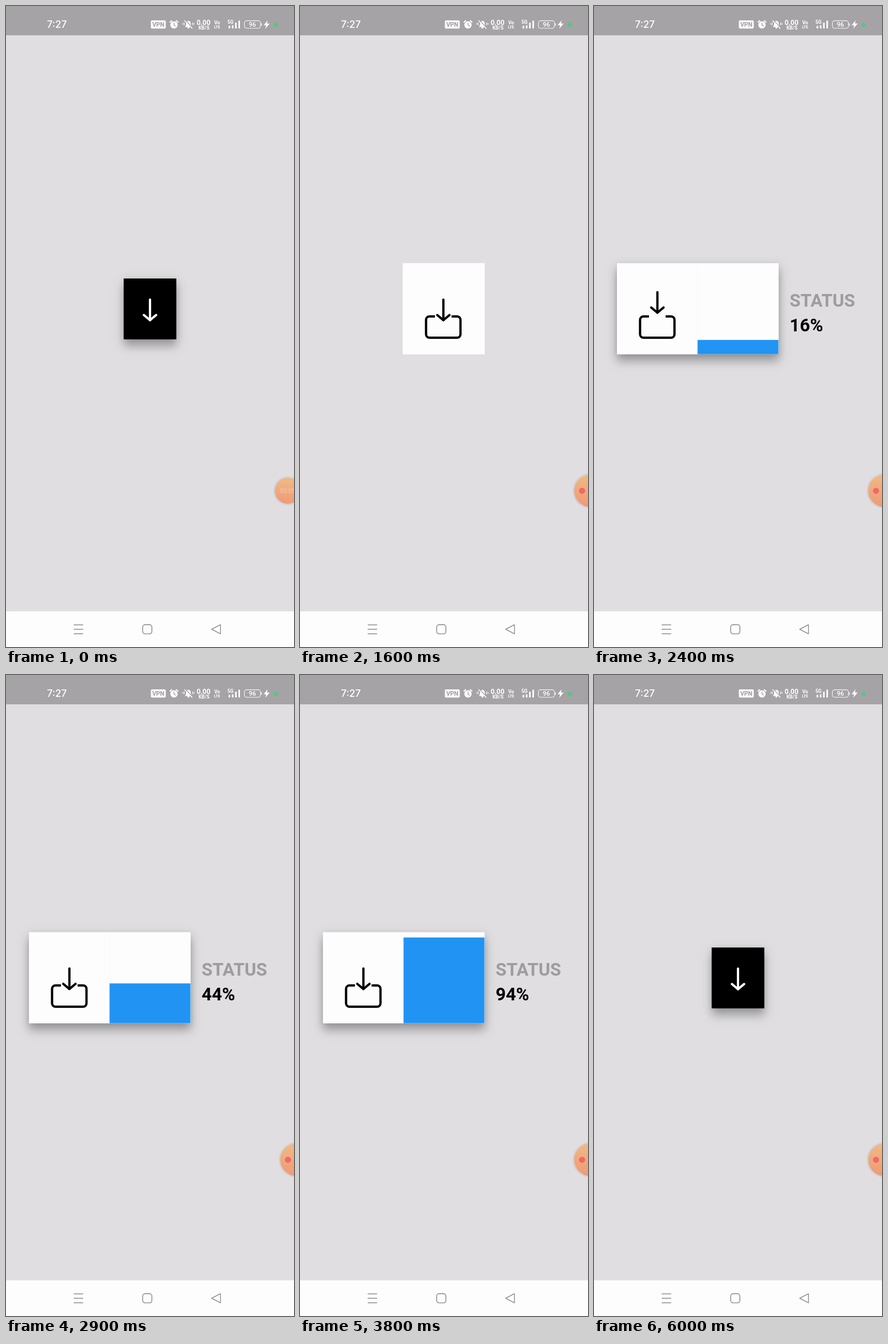
An HTML page with a canvas that plays this animation: 502 px wide and 1115 px high, repeating every 6700 ms.

```html
<!DOCTYPE html>
<html lang="en">
<head>
<meta charset="utf-8">
<title>Download button</title>
<style>
  html, body { margin: 0; width: 100%; height: 100%; overflow: hidden; background: #e0dee1; }
  canvas { display: block; width: 502px; height: 1115px; }
</style>
</head>
<body>
<canvas id="stage"></canvas>
<script>
const W = 502, H = 1115, LOOP = 6700, STEP = 100;
const canvas = document.getElementById('stage');
const dpr = window.devicePixelRatio || 1;
canvas.width = W * dpr;
canvas.height = H * dpr;
const c = canvas.getContext('2d');

// Button geometry
const SMALL = { x: 205.5, y: 474, w: 91, h: 105.5 };
const PANEL = { x: 180.5, y: 447.7, w: 141, h: 158 };
const BLUE = '#2194f3';

const clamp = v => Math.min(1, Math.max(0, v));
const span = (t, a, b) => clamp((t - a) / (b - a));
const ease = p => p * p * (3 - 2 * p);
const mix = (a, b, p) => a + (b - a) * p;

function rect(x, y, w, h, color) {
  c.fillStyle = color;
  c.fillRect(x, y, w, h);
}

function disc(x, y, r, color) {
  c.fillStyle = color;
  c.beginPath();
  c.arc(x, y, r, 0, Math.PI * 2);
  c.fill();
}

function line(points, color, width, cap = 'round', close = false) {
  c.strokeStyle = color;
  c.lineWidth = width;
  c.lineCap = cap;
  c.lineJoin = cap === 'round' ? 'round' : 'miter';
  c.beginPath();
  points.forEach(([x, y], i) => i ? c.lineTo(x, y) : c.moveTo(x, y));
  if (close) c.closePath();
  c.stroke();
}

function roundBox(x, y, w, h, r) {
  c.beginPath();
  c.roundRect(x, y, w, h, r);
}

function text(str, x, y, size, weight, color, align = 'left', family = 'Roboto') {
  c.font = `${weight} ${size}px ${family}, sans-serif`;
  c.textAlign = align;
  c.fillStyle = color;
  c.fillText(str, x, y);
}

function alarmIcon(x, y) {
  disc(x, y + 0.8, 6.4, '#fff');
  line([[x - 7, y - 4], [x - 4, y - 6.5]], '#fff', 1.8);
  line([[x + 7, y - 4], [x + 4, y - 6.5]], '#fff', 1.8);
  line([[x, y - 2.5], [x, y + 1.2], [x + 2.6, y + 2.8]], '#a5a3a6', 1.4);
}

function bellIcon(x, y) {
  c.fillStyle = '#fff';
  c.beginPath();
  c.moveTo(x - 6, y + 4.5);
  c.quadraticCurveTo(x - 4, y + 2, x - 4, y - 1.5);
  c.bezierCurveTo(x - 4, y - 8, x + 4, y - 8, x + 4, y - 1.5);
  c.quadraticCurveTo(x + 4, y + 2, x + 6, y + 4.5);
  c.fill();
  disc(x, y + 5.5, 1.8, '#fff');
  line([[x - 5, y - 7], [x + 7.5, y + 6]], '#a5a3a6', 1.6);
  line([[x - 6.5, y - 6.5], [x + 6.5, y + 7]], '#fff', 1.4);
  for (const s of [-1, 1]) {
    line([[x + s * 7.5, y - 3], [x + s * 7.5, y + 1]], '#fff', 1.2);
    line([[x + s * 10, y - 2], [x + s * 10, y]], '#fff', 1.1);
  }
}

function statusBar() {
  rect(0, 0, W, 51, '#a5a3a6');
  text('7:27', 71.5, 38, 17, 500, '#fff', 'left', 'Inter');

  c.fillStyle = '#fbfafb';
  roundBox(252.5, 25, 26, 14.3, 2);
  c.fill();
  text('VPN', 265.5, 36, 10.5, 700, '#a09ea1', 'center');

  alarmIcon(292.8, 32);
  bellIcon(318, 32);
  text('0.00', 344.3, 33, 12, 700, '#fff', 'center');
  text('KB/S', 345, 41, 8.5, 700, '#fff', 'center');
  text('Vo', 368, 31.5, 8.5, 700, '#fff', 'center');
  text('LTE', 368, 39.3, 6.5, 700, '#fff', 'center');
  text('5G', 391.3, 31, 8.5, 700, '#fff', 'center');
  [4.5, 5.5, 10, 13.5].forEach((h, i) => rect(388 + i * 5.7, 39 - h, 2.7, h, '#fff'));

  c.strokeStyle = '#f4f3f4';
  c.lineWidth = 1.1;
  roundBox(415.5, 25.6, 28, 13.2, 4);
  c.stroke();
  rect(444.6, 30, 1.4, 4.5, '#f4f3f4');
  text('96', 429.5, 36.2, 11, 500, '#fff', 'center');

  c.fillStyle = '#fff';
  c.beginPath();
  [[456, 25], [449, 33.5], [453.5, 33.5], [452, 39.5], [459.5, 30.5], [454.8, 30.5]]
    .forEach(([x, y]) => c.lineTo(x, y));
  c.fill();
  disc(470, 33, 3.6, '#4fca80');
}

function navBar() {
  rect(0, 1053, W, H - 1053, '#fefdfe');
  const grey = '#88868a';
  for (const y of [1076.5, 1084.2, 1092]) line([[118, y], [134.5, y]], grey, 1.4, 'butt');
  c.strokeStyle = grey;
  c.lineWidth = 1.4;
  roundBox(238.3, 1076.3, 16, 15.8, 4);
  c.stroke();
  line([[358.5, 1084.2], [373.8, 1076.2], [373.8, 1092.2]], grey, 1.3, 'round', true);
}

function shadowed(x, y, w, h, color, strength) {
  const layers = [[12, 16, 0.29], [1, 12, 0.12]];
  for (const [dy, blur, alpha] of layers) {
    c.save();
    c.shadowColor = `rgba(0,0,0,${alpha * strength})`;
    c.shadowOffsetY = dy * dpr;
    c.shadowBlur = blur * dpr;
    rect(x, y, w, h, color);
    c.restore();
  }
  rect(x, y, w, h, color);
}

function arrow(x, dy, color) {
  line([[x, 510.8 + dy], [x, 546.5 + dy]], color, 4);
  line([[x - 10.7, 537.5 + dy], [x, 546.5 + dy], [x + 10.7, 537.5 + dy]], color, 4);
}

function tray(x, alpha) {
  c.save();
  c.globalAlpha = alpha;
  c.strokeStyle = '#000';
  c.lineWidth = 4;
  c.lineCap = 'butt';
  c.beginPath();
  c.moveTo(x - 14.5, 540);
  c.arcTo(x - 30, 540, x - 30, 577, 6);
  c.arcTo(x - 30, 577, x + 30, 577, 6);
  c.arcTo(x + 30, 577, x + 30, 540, 6);
  c.arcTo(x + 30, 540, x + 14.5, 540, 6);
  c.lineTo(x + 14.5, 540);
  c.stroke();
  c.restore();
}

function button(t) {
  if (t < 1200 || t >= 5200) {
    shadowed(SMALL.x, SMALL.y, SMALL.w, SMALL.h, '#000', 1);
    arrow(251, 0, '#fff');
    return;
  }

  const grow = ease(span(t, 1230, 1560));
  const slide = ease(span(t, 1570, 2150));
  const progress = span(t, 2120, 3900);
  const shift = 140.5 * slide;
  const x = mix(SMALL.x, PANEL.x, grow), y = mix(SMALL.y, PANEL.y, grow);
  const w = mix(SMALL.w, PANEL.w, grow), h = mix(SMALL.h, PANEL.h, grow);
  const strength = Math.max(1 - span(t, 1230, 1560), span(t, 1870, 2200));

  if (slide > 0) {
    const tx = 341 - 140.5 * (1 - slide);
    text('STATUS', tx, 523.3, 31, 700, '#9e9c9f');
    text(Math.round(progress * 100) + '%', tx, 565.6, 31, 700, '#000');
  }

  shadowed(x - shift, y, w + shift, h, '#fefdfe', strength);
  if (slide === 1) rect(180, y, 0.8, h, '#f7f5f7');
  const fill = PANEL.h * progress;
  if (fill) rect(PANEL.x, PANEL.y + PANEL.h - fill, PANEL.w, fill, BLUE);

  // Two hops while the transfer runs
  const hop = (1 - Math.cos(span(t, 1850, 3850) * 4 * Math.PI)) / 2;
  tray(250.8 - shift, span(t, 1330, 1560));
  arrow(251 - shift, -13.4 * hop, '#000');

  if (t >= 4300) line([[235.5, 538.5], [251, 548.3], [276, 505.5]], '#fff', 4, 'butt');
}

function bubble(t) {
  const p = ease(span(t, 0, 700));
  const x = mix(491.3, 506, p), y = 843.3, r = mix(22.5, 28, p);
  disc(x, y, r + 3, 'rgba(90,70,70,0.05)');
  disc(x, y, r + 1.6, 'rgba(90,70,70,0.07)');
  const g = c.createLinearGradient(x, y - r, x - r * 0.3, y + r);
  g.addColorStop(0, '#f1ba84');
  g.addColorStop(1, '#ef9a77');
  disc(x, y, r, g);
  c.globalAlpha = 0.55 * (1 - span(t, 0, 300));
  text('00:05', 478, 847, 10.5, 400, '#fbe3cc');
  c.globalAlpha = span(t, 100, 500);
  disc(491.6, 843.3, 5.4, '#ee6a66');
  c.globalAlpha = 1;
}

function draw(t) {
  c.setTransform(dpr, 0, 0, dpr, 0, 0);
  rect(0, 0, W, H, '#e0dee1');
  button(t);
  bubble(t);
  statusBar();
  navBar();
}

const start = performance.now();
function tick() {
  const t = (performance.now() - start) % LOOP;
  draw(Math.floor(t / STEP) * STEP);
  requestAnimationFrame(tick);
}
tick();
</script>
</body>
</html>
```
